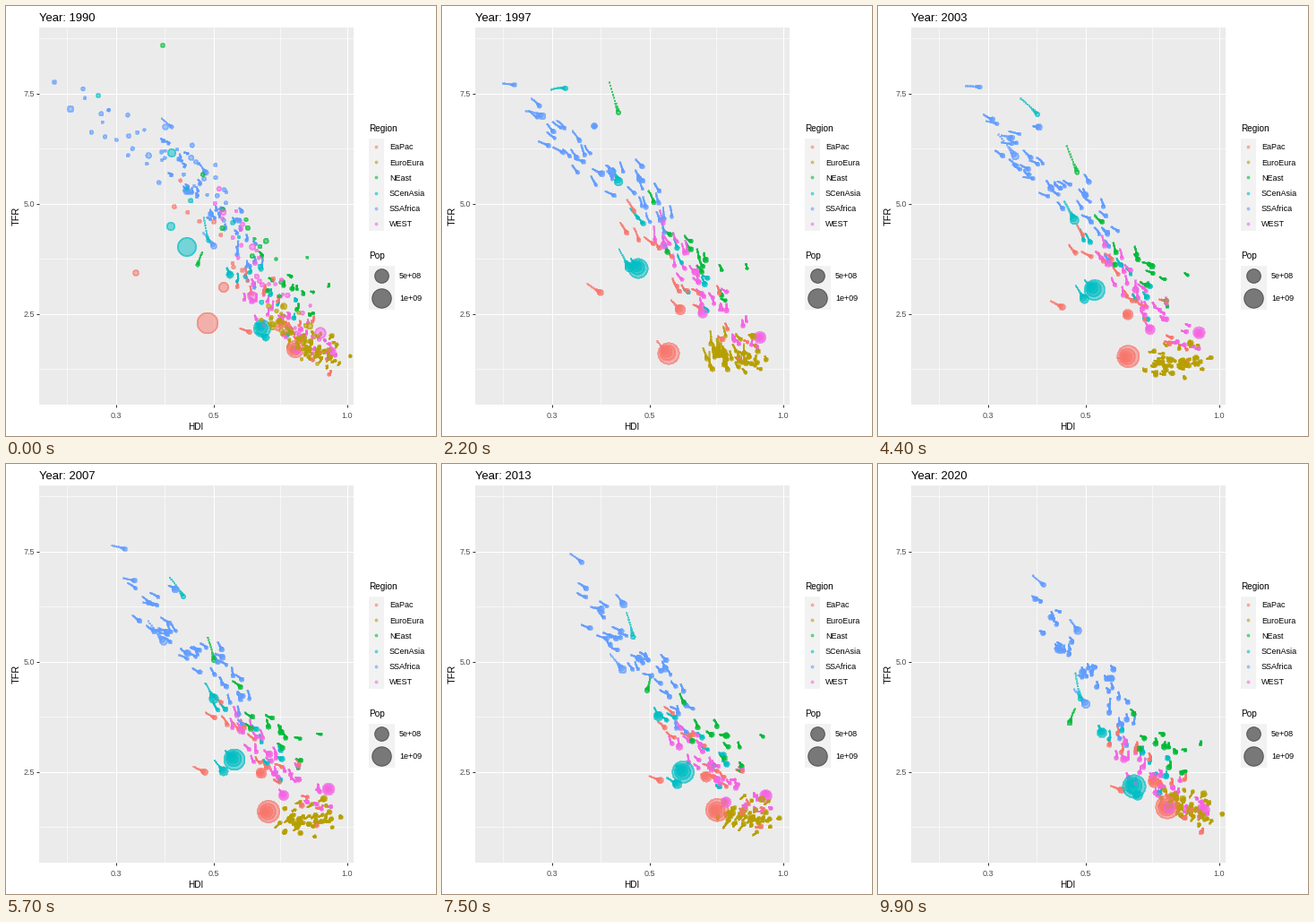
Animation, 480 px wide and 480 px high, one loop 10 s. Source, as a matplotlib script:

```python
import numpy as np
import matplotlib.pyplot as plt
from matplotlib.animation import FuncAnimation
from matplotlib.colors import to_rgba
from matplotlib.patches import Rectangle

SIZE, FRAMES, WAKE = 480, 100, 10
COLORS = {"EaPac": "#F8766D", "EuroEura": "#B79F00", "NEast": "#00BA38",
          "SCenAsia": "#00BFC4", "SSAfrica": "#619CFF", "WEST": "#F564E3"}
GROWTH = {"EaPac": 1.25, "EuroEura": 1.0, "NEast": 1.8,
          "SCenAsia": 1.6, "SSAfrica": 2.2, "WEST": 1.35}

plt.rcParams["font.family"] = "Liberation Sans"
rng = np.random.default_rng(11)
frames = np.arange(FRAMES)
time = frames / (FRAMES - 1)
fall = time ** 0.7  # fertility drops fastest early on
rise = np.interp(time, [0, 0.9, 0.97, 1], [0, 0.96, 1, 0.985])  # HDI stalls late
points = []


def add(region, pop, x, y):
    pops = pop * GROWTH[region] ** time
    size = 1 + 11 * np.sqrt(pops / 1411)
    points.append((np.c_[x, y], size, to_rgba(COLORS[region], 0.5)))


def smooth(values, keys=np.array([0, 22, 57, 99])):
    """Cubic Hermite curve through a value at each key time."""
    slope = np.gradient(values, keys)
    i = np.clip(np.searchsorted(keys, frames, side="right") - 1, 0, len(keys) - 2)
    h = keys[i + 1] - keys[i]
    u = (frames - keys[i]) / h
    return ((1 + 2 * u) * (1 - u) ** 2 * values[i] + u * (1 - u) ** 2 * h * slope[i]
            + u * u * (3 - 2 * u) * values[i + 1] + u * u * (u - 1) * h * slope[i + 1])


def path(region, pop, *stops):
    xy = np.array(stops, float)
    add(region, pop, smooth(xy[:, 0]), smooth(xy[:, 1]))


def crowd(region, count, first, last, spread, dip=0):
    """Spread countries along a line that glides from `first` to `last`.

    Each line is (poor end, rich end); `dip` is a passing slump in births.
    """
    (a0, b0), (a1, b1) = np.array(first, float), np.array(last, float)
    for s in (np.arange(count) + rng.random(count)) / count:
        start, end = a0 + (b0 - a0) * s, a1 + (b1 - a1) * s
        shift = rng.normal(0, spread, 2) * (0.6, 1)
        start, end = start + shift, end + shift * 0.8 + rng.normal(0, spread / 3, 2)
        phase, waves = rng.uniform(0, 2 * np.pi), rng.uniform(1, 3)
        wobble = np.sin(phase + 2 * np.pi * waves * time)
        x = start[0] + (end[0] - start[0]) * rise + 2 * wobble
        y = start[1] + (end[1] - start[1]) * fall - 2 * wobble
        y += dip * (1.1 - s) * np.sin(np.pi * fall)
        add(region, min(rng.lognormal(1.6, 1), 50), x, y)


# Countries that stand out: population in millions and four waypoints
path("EaPac", 1135, (225, 354), (253, 388), (293, 388), (323, 383))
path("EaPac", 182, (243, 314), (266, 339), (285, 345), (308, 355))
path("EaPac", 40, (145, 298), (177, 320), (222, 344), (272, 364))
path("SCenAsia", 870, (202, 269), (219, 293), (255, 330), (286, 360))
path("SCenAsia", 103, (184, 246), (209, 292), (243, 343), (290, 370))
path("SCenAsia", 107, (185, 164), (197, 196), (232, 262), (250, 300))
path("SCenAsia", 12, (103, 100), (138, 92), (198, 148), (226, 262))
path("SSAfrica", 38, (178, 135), (170, 134), (189, 140), (223, 186))
path("SSAfrica", 50, (72, 115), (112, 123), (176, 198), (232, 268))
path("SSAfrica", 8, (54, 85), (81, 88), (133, 95), (185, 135))
path("NEast", 12, (175, 44), (197, 119), (232, 219), (214, 289))
path("WEST", 250, (351, 365), (355, 370), (360, 363), (363, 386))
path("WEST", 150, (275, 324), (291, 343), (310, 370), (325, 384))

# Everyone else follows the drift of the region
crowd("SSAfrica", 38, ((88, 118), (255, 218)), ((180, 165), (285, 300)), 17)
crowd("EaPac", 16, ((185, 190), (335, 392)), ((262, 288), (366, 412)), 11)
crowd("SCenAsia", 8, ((205, 200), (300, 335)), ((268, 300), (332, 365)), 14)
crowd("NEast", 13, ((230, 200), (328, 315)), ((290, 290), (355, 345)), 16)
crowd("WEST", 30, ((235, 215), (347, 380)), ((268, 325), (368, 393)), 10)
crowd("EuroEura", 44, ((292, 345), (350, 392)), ((322, 375), (371, 395)), 9, 40)

points = [points[i] for i in rng.permutation(len(points))]
pos = np.stack([p for p, _, _ in points], axis=1)
sizes = np.stack([s for _, s, _ in points], axis=1)
rgba = np.array([c for _, _, c in points])

fig = plt.figure(figsize=(SIZE / 72, SIZE / 72), dpi=72, facecolor="white")
ax = fig.add_axes([0, 0, 1, 1])
ax.set(xlim=(0, SIZE), ylim=(SIZE, 0))
ax.axis("off")


def box(x0, y0, x1, y1, color):
    ax.add_patch(Rectangle((x0, y0), x1 - x0, y1 - y0, fc=color, lw=0, zorder=0))


def label(x, y, s, size, color="black", ha="left", **kw):
    return ax.text(x, y, s, fontsize=size, color=color, ha=ha, **kw)


def radius(size):
    return np.maximum(0.375 * (2.845 * size + 0.945) - 0.5, 0.35)


def area(r):
    return (2 * r) ** 2


def dots(xy, size, color):
    return ax.scatter(*np.transpose(xy), s=area(radius(size)), c=color,
                      lw=0.95, antialiased=False, zorder=3)


def grid(value_x, value_y, width):
    ax.vlines(value_x, 24, 445, color="white", lw=width, zorder=1)
    ax.hlines(value_y, 37, 388, color="white", lw=width, zorder=1)


def hdi_x(v):
    return 122.5 + 214.3 * np.log(v / 0.3)


def tfr_y(v):
    return 97.5 + 49.2 * (7.5 - v)


# Panel, grid and axes
box(37, 24, 388, 445, "#EBEBEB")
hdi, tfr = np.array([0.3, 0.5, 1.0]), np.array([7.5, 5.0, 2.5])
minor = np.sqrt(hdi[:-1] * hdi[1:])
grid(hdi_x(np.r_[minor[0] * 0.6, minor]), tfr_y(np.r_[8.75, tfr - 1.25]), 0.6)
grid(hdi_x(hdi), tfr_y(tfr), 1.0)
for v in hdi:
    ax.vlines(hdi_x(v), 445, 448, color="#333333", lw=1)
    label(hdi_x(v), 460, f"{v:.1f}", 9, "#4D4D4D", "center")
for v in tfr:
    ax.hlines(tfr_y(v), 34, 37, color="#333333", lw=1)
    label(32, tfr_y(v) + 3.5, f"{v:.1f}", 9, "#4D4D4D", "right")
label(212, 473, "HDI", 10, ha="center")
label(12, 234, "TFR", 11, ha="center", va="center", rotation=90)
title = label(37, 17, "", 13)

# Legends
label(405, 140, "Region", 10)
box(405, 148, 422, 251, "#F2F2F2")
for k, (name, color) in enumerate(COLORS.items()):
    y = 157 + 17.2 * k
    dots([(413, y)], 1.5, [to_rgba(color, 0.5)])
    label(428, y + 3.5, name, 9)
label(405, 282, "Pop", 10)
box(405, 290, 434, 339, "#F2F2F2")
for y, pop, s in ((300.5, 500, "5e+08"), (325.5, 1000, "1e+09")):
    dots([(419, y)], 1 + 11 * np.sqrt(pop / 1411), [(0, 0, 0, 0.5)])
    label(439, y + 3.5, s, 9)

lags = np.arange(WAKE, -1, -1)
shrink = (1 - lags / WAKE) ** 3
cloud = dots(pos[0], sizes[0], rgba)
cloud.set_color(np.tile(rgba, (WAKE + 1, 1)))


def draw(frame):
    past = (frame - lags) % FRAMES
    cloud.set_offsets(pos[past].reshape(-1, 2))
    cloud.set_sizes(area(radius(sizes[past] * shrink[:, None])).ravel())
    title.set_text(f"Year: {1990 + round(30 * time[frame])}")
    return cloud, title


anim = FuncAnimation(fig, draw, frames=FRAMES, interval=100, repeat=True, repeat_delay=0)
plt.show()
```
